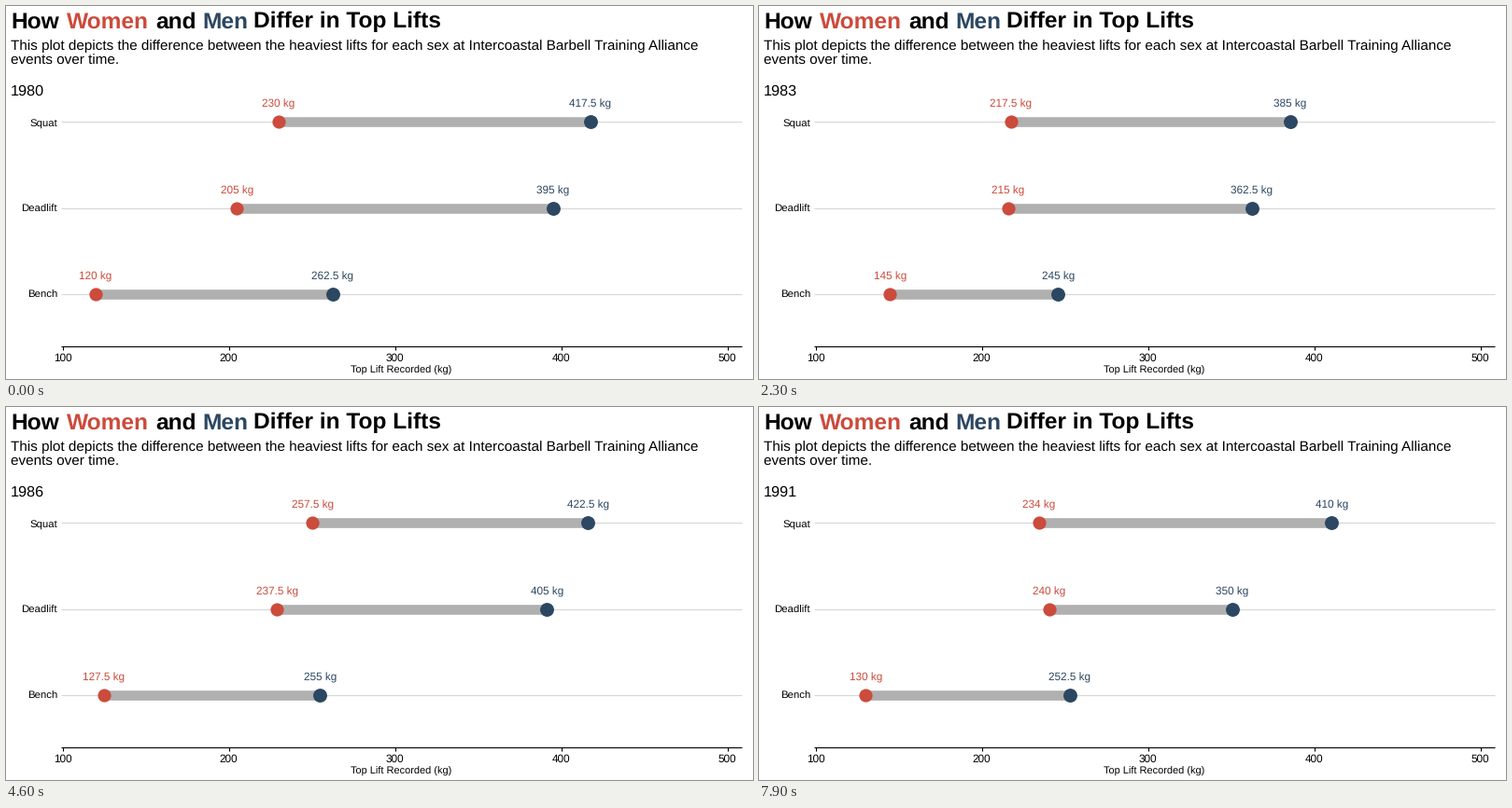
Write a matplotlib script that moves like this. It is 800x400 px and loops after 8 s.

```python
import numpy as np
import matplotlib as mpl
import matplotlib.pyplot as plt
from matplotlib.animation import FuncAnimation

mpl.rcParams["font.family"] = "Liberation Sans"
mpl.rcParams["text.hinting"] = "none"

RED, NAVY, BAR, GRID = "#cb4b3c", "#2c4762", "#b0b0b0", "#d6d6d6"
LEFT, RIGHT = 59, 788
ROWS = {"Squat": 124.3, "Deadlift": 216.8, "Bench": 309.3}
FIRST_YEAR = 1980
HOLD, MOVE = 2, 5  # frames at rest, frames in transition
N_FRAMES, INTERVAL = 80, 100

# One line per year: women, men for squat, deadlift and bench.
LIFTS = np.array([
    [230, 417.5, 205, 395, 120, 262.5],
    [215, 427.5, 230, 367.5, 150, 245],
    [215, 367.5, 210, 352.5, 122.5, 245],
    [217.5, 385, 215, 362.5, 145, 245],
    [217.5, 400, 245, 360, 137.5, 272.5],
    [242.5, 400, 242.5, 362.5, 137.5, 237.5],
    [230, 397.5, 205, 352.5, 117.5, 255],
    [257.5, 422.5, 237.5, 405, 127.5, 255],
    [252.5, 422.5, 227.5, 377.5, 135, 232.5],
    [227.5, 410, 242.5, 380, 140, 240],
    [235, 413, 235, 365, 135, 245],
    [234, 410, 240, 350, 130, 252.5],
    [247.5, 430, 260, 370, 135, 270],
])

fig = plt.figure(figsize=(8, 4), dpi=100, facecolor="white")
ax = fig.add_axes([0, 0, 1, 1])
ax.set(xlim=(0, 800), ylim=(400, 0))
ax.axis("off")


def pt(px):
    return px * 0.72


def kg_to_x(kg):
    return 60.5 + (kg - 100) * 1.78


def write(x, y, text, px, color="black", **kw):
    return ax.text(x, y, text, fontsize=pt(px), color=color, va="baseline", **kw)


def stroke(xs, ys, color, px, z):
    return ax.plot(xs, ys, color=color, lw=pt(px), zorder=z,
                   solid_capstyle="butt")[0]


def ease(t):
    return 4 * t**3 if t < 0.5 else 1 - 4 * (1 - t)**3


# Headings
for x, word, color in [(5, "How", "black"), (65, "Women", RED),
                       (160.5, "and", "black"), (210, "Men", NAVY),
                       (265, "Differ in Top Lifts", "black")]:
    write(x, 23.5, word, 24.5, color, weight="bold")
write(5, 47, "This plot depicts the difference between the heaviest lifts for "
      "each sex at Intercoastal Barbell Training Alliance", 15.27)
write(5, 63, "events over time.", 15.27)
year_text = write(5, 96, "", 16.2)

# Axis
stroke([LEFT, RIGHT], [364.5, 364.5], "black", 1.1, 1)
for kg in range(100, 501, 100):
    x = kg_to_x(kg)
    stroke([x, x], [364.5, 368.5], "black", 1.1, 1)
    write(x, 381, str(kg), 11.8, ha="center")
write(423.3, 394, "Top Lift Recorded (kg)", 10.95, ha="center")

# Rows
bars, dots, labels = [], [], []
for name, y in ROWS.items():
    stroke([LEFT, RIGHT], [y, y], GRID, 1.1, 1)
    write(55, y + 4, name, 11.4, ha="right")
    bars.append(stroke([0, 0], [y, y], BAR, 10.6, 2))
    for color, size in [(RED, 14.2), (NAVY, 14.9)]:
        dots.append(ax.plot([0], [y], "o", color=color, ms=pt(size),
                            mew=0, zorder=3)[0])
        labels.append(write(0, y - 15.3, "", 11.75, color, ha="center",
                            zorder=4))


def draw(frame):
    state, step = divmod(frame, HOLD + MOVE)
    step = max(0, step - HOLD + 1)
    t = ease(step / MOVE)
    start, end = LIFTS[state], LIFTS[state + 1]
    xs = kg_to_x(start + (end - start) * t)
    shown = end if t >= 0.5 else start

    year_text.set_text(str(FIRST_YEAR + state + (step > 3)))
    for i, bar in enumerate(bars):
        bar.set_xdata(xs[2 * i:2 * i + 2])
    for dot, label, x, kg in zip(dots, labels, xs, shown):
        dot.set_xdata([x])
        label.set_x(x)
        label.set_text(f"{kg:g} kg")
    return [year_text, *bars, *dots, *labels]


anim = FuncAnimation(fig, draw, frames=N_FRAMES, interval=INTERVAL,
                     repeat=True, repeat_delay=0)
plt.show()
```
